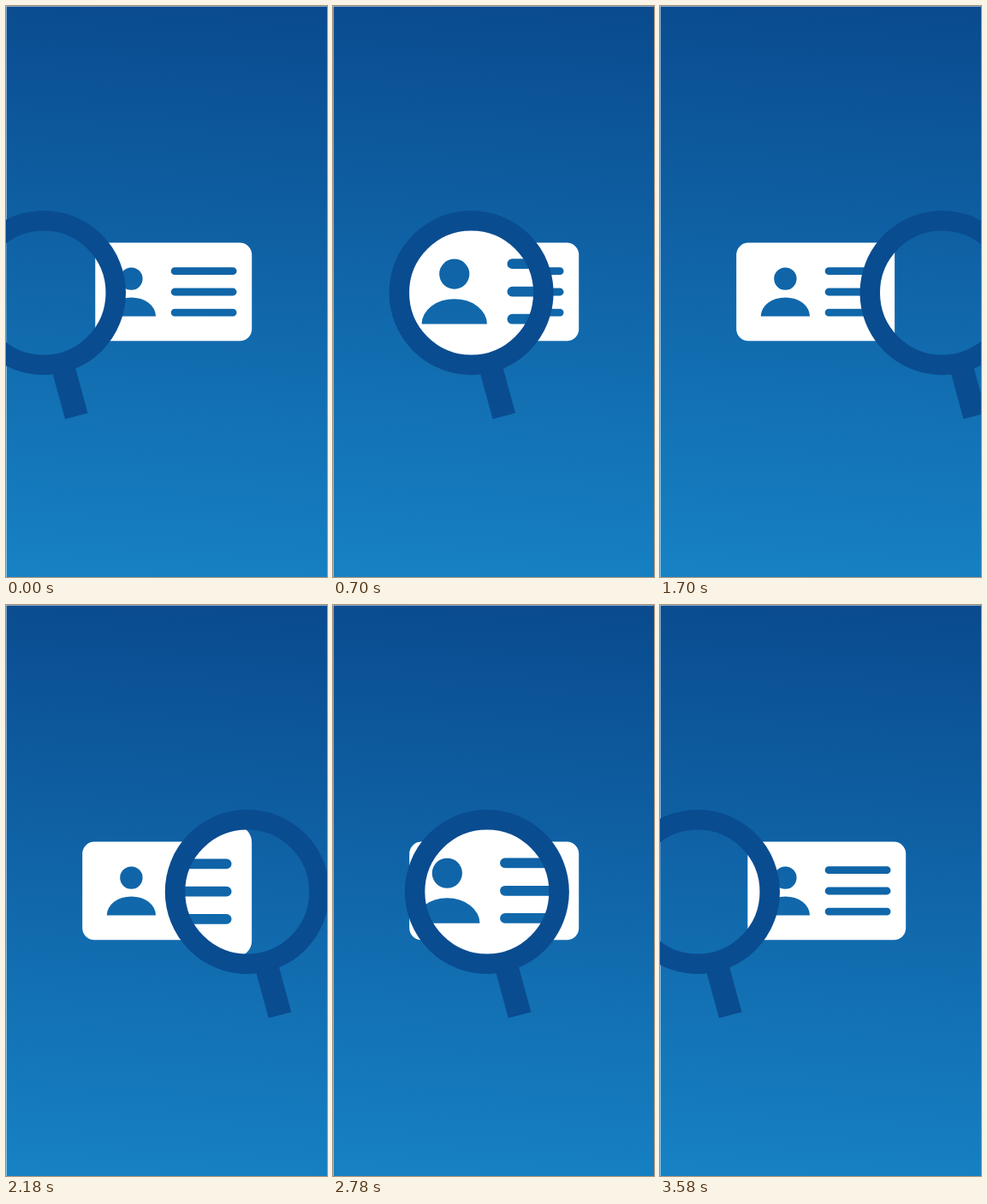
An HTML page for the animation above (3.6 s loop, 375 by 667 pixels).

```html
<!DOCTYPE html>
<html lang="en">
<head>
<meta charset="utf-8">
<title>Card under a magnifier</title>
<style>
  html, body { margin: 0; width: 100%; height: 100%; overflow: hidden; background: #fff; }
  svg { display: block; width: 375px; height: 667px; }
</style>
</head>
<body>
<svg viewBox="0 0 375 667">
  <defs>
    <linearGradient id="sky" gradientUnits="userSpaceOnUse" x1="210" y1="0" x2="165" y2="667">
      <stop offset="0" stop-color="#0a4b8f"/>
      <stop offset="1" stop-color="#1681c3"/>
    </linearGradient>
    <rect id="back" x=".5" y=".5" width="375" height="667" fill="url(#sky)"/>
    <path id="card" fill="#fff" fill-rule="evenodd"/>
    <clipPath id="glass"><circle id="hole" cy="335" r="74"/></clipPath>
  </defs>
  <use href="#back"/>
  <use href="#card"/>
  <g clip-path="url(#glass)">
    <use href="#back"/>
    <use id="zoomed" href="#card"/>
  </g>
  <g id="lens">
    <path d="M8.5 87L35 80L51.5 140.5L25 147.5Z" fill="#0a4c90"/>
    <circle r="84.25" fill="none" stroke="#0a4c90" stroke-width="23.5"/>
  </g>
</svg>
<script>
const $ = id => document.getElementById(id);
const LOOP = 3600, STEP = 20, TURN = 1800, END = 3580;
const LEFT = 44, TRAVEL = 302.3, ZOOM = 4 / 3;

const roundRect = (x, y, w, h, r) =>
  `M${x + r} ${y}h${w - 2 * r}a${r} ${r} 0 0 1 ${r} ${r}v${h - 2 * r}a${r} ${r} 0 0 1 ${-r} ${r}` +
  `h${2 * r - w}a${r} ${r} 0 0 1 ${-r} ${-r}v${2 * r - h}a${r} ${r} 0 0 1 ${r} ${-r}z`;

// The portrait and text bars are holes that let the gradient through.
$('card').setAttribute('d', [
  roundRect(89.2, 276.6, 198, 114.7, 14),
  roundRect(133.2, 305.4, 26.4, 26.4, 13.2),
  'M117.8 362.4A28.6 22 0 0 1 175 362.4z',
  ...[309.7, 334, 358.1].map(y => roundRect(192.7, y - 4.4, 76.8, 8.8, 4.4))
].join(''));

function draw(t) {
  const out = t < TURN;
  const p = out ? t / TURN : (END - t) / (END - TURN);
  const x = LEFT + TRAVEL * p;
  const lag = out ? 1.1 * p : -1.9;
  const y = 333.6 + (x - 161) * 0.009;
  $('hole').setAttribute('cx', x);
  $('lens').setAttribute('transform', `translate(${x} 335)`);
  $('zoomed').setAttribute('transform',
    `translate(${x + lag} ${y}) scale(${ZOOM}) translate(${-x} -334)`);
}

const start = performance.now();
function tick() {
  const t = (performance.now() - start + 1) % LOOP;
  draw(Math.floor(t / STEP) * STEP);
  requestAnimationFrame(tick);
}
tick();
</script>
</body>
</html>
```
